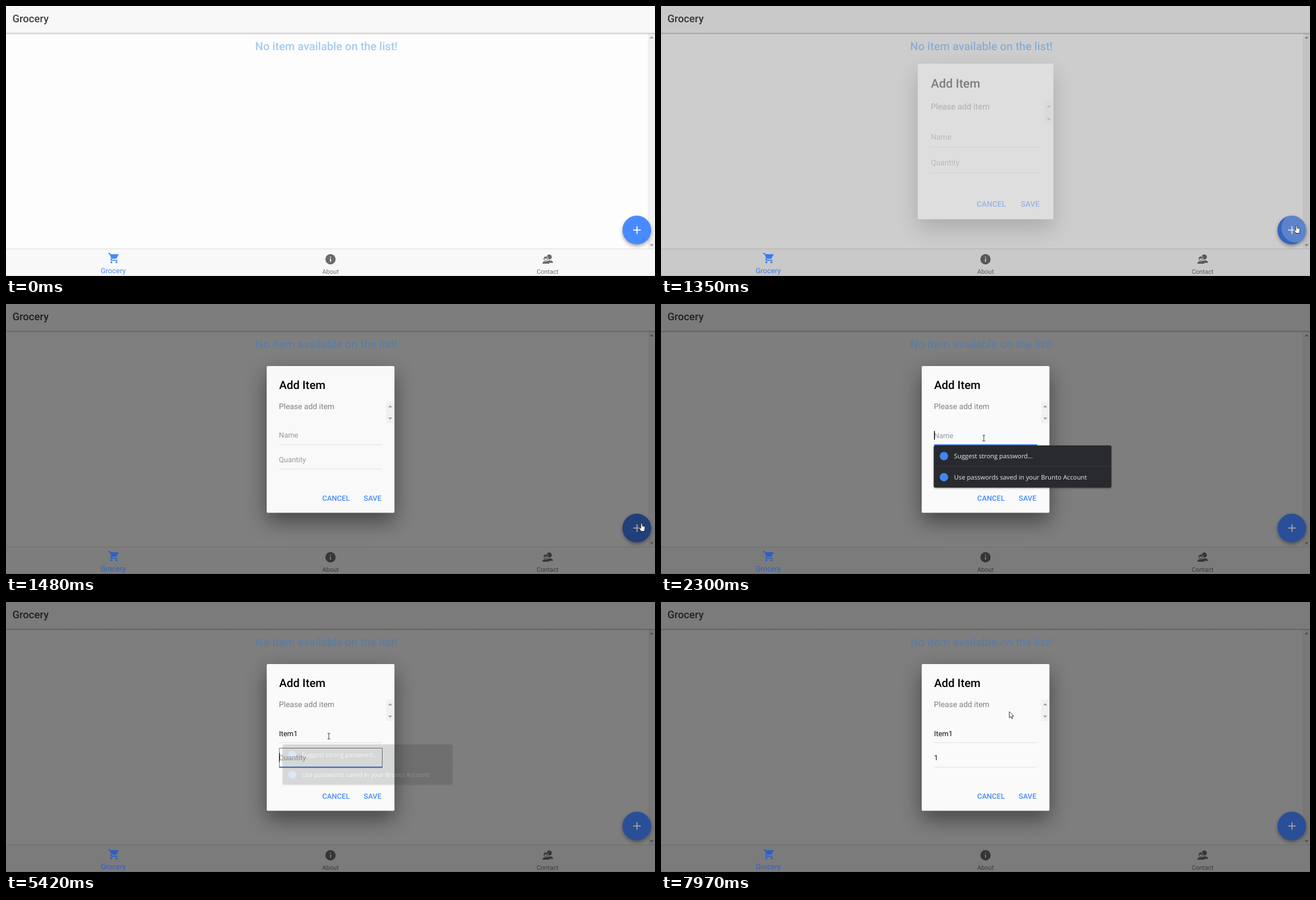
These frames come from a looping animation (1160x483 px, 8 s). An HTML page:

```html
<!DOCTYPE html>
<html lang="en">
<head>
<meta charset="utf-8">
<title>Grocery list</title>
<style>
  html, body { margin: 0; width: 100%; height: 100%; overflow: hidden; background: #fdfdfd; }
  svg { display: block; }
  text { font-family: Roboto, sans-serif; text-rendering: geometricPrecision; white-space: pre; }
  .medium { font-weight: 500; }
  .mid { text-anchor: middle; }
  .tab { font-size: 11.15px; fill: #6c7076; }
  .field { font-size: 13px; }
  .button { font-size: 13px; fill: #488aff; }
  .popup rect { fill: #292a2d; }
  .popup text { font: 11.3px "Open Sans", sans-serif; fill: #e8eaed; }
  .popup { filter: drop-shadow(0 1px 1.5px rgba(0,0,0,.4)); }
  #history text { font-size: 10.6px; font-weight: 600; }
  #dialog { filter: drop-shadow(0 15px 18.6px rgba(0,0,0,.45)); }
  #fab { filter: drop-shadow(0 3px 3px rgba(0,0,0,.35)); }
</style>
</head>
<body>
<svg width="1160" height="483" viewBox="0 0 1160 483">
  <defs>
    <linearGradient id="edge" x2="0" y2="1">
      <stop stop-opacity=".24"/><stop offset="1" stop-opacity="0"/>
    </linearGradient>
    <clipPath id="fabClip"><circle cx="1127.5" cy="400.8" r="25.7"/></clipPath>
    <path id="up" d="M-3.5 2L0-2 3.5 2Z" fill="#a0a0a0"/>
  </defs>

  <!-- page -->
  <rect width="1160" height="483" fill="#fdfdfd"/>
  <rect x="1147" y="49" width="13" height="386" fill="#f1f1f1"/>
  <use href="#up" x="1154" y="56"/>
  <use href="#up" transform="translate(1154 428) scale(1 -1)"/>
  <rect width="1160" height="48" fill="#f8f8f8"/>
  <rect y="48" width="1160" height="3.5" fill="url(#edge)"/>
  <text class="medium" x="11.4" y="29.3" font-size="18.6" fill="#424242">Grocery</text>
  <rect y="434" width="1160" height="49" fill="#f8f8f8"/>
  <path d="M0 434.5H1160M0 482.5H1160" stroke="#dadada"/>
  <circle cx="580" cy="453" r="9.2" fill="#6b6b6b"/>
  <path d="M580 452V457.6M580 448.4V450.3" stroke="#f8f8f8" stroke-width="1.9"/>
  <text class="tab mid" x="580" y="478.5">About</text>
  <g fill="#6b6b6b">
    <circle cx="971" cy="449" r="4.6"/>
    <path d="M967 459.500V456.500Q971 454 975 455.500Q978 457 978 459.500Z"/>
    <path d="M958.800 461Q959 456.600 964.500 456.300Q970 456.600 971.500 461Z"/>
    <circle cx="964.700" cy="452" r="4.300" stroke="#f8f8f8"/>
    <path d="M962 451.500Q965 452.500 967.500 451Q967.500 455 964.800 455Q962.300 455 962 451.500Z" fill="#f8f8f8"/>
  </g>
  <text class="tab mid" x="968" y="478.5">Contact</text>

  <rect id="backdrop" width="1160" height="483"/>

  <!-- coloured parts whose dimmed tint is set separately -->
  <text id="empty" class="medium mid" x="572.7" y="79.2" font-size="20.1">No item available on the list!</text>
  <g id="active">
    <path transform="translate(182 440.300) scale(.91)" d="M7 18a2 2 0 1 0 0 4a2 2 0 0 0 0-4zM1 2v2h2l3.600 7.600-1.350 2.450C4.500 15.400 5.500 17 7 17h12v-2H7.420q-.4-.1-.220-.4l.9-1.600h7.450q1.200 0 1.750-1l3.580-6.500Q21.500 4.200 20 4H5.210l-.940-2zM17 18a2 2 0 1 0 0 4a2 2 0 0 0 0-4z"/>
    <text class="mid" x="191.7" y="478.4" font-size="13">Grocery</text>
  </g>
  <g id="fab"><circle id="fabFace" cx="1127.5" cy="400.8" r="25.7"/></g>
  <circle id="press" cx="1127.5" cy="400.8" r="25.7"/>
  <g clip-path="url(#fabClip)"><circle id="ripple" cx="1135" cy="397" r="0" fill="#fff"/></g>
  <path id="plus" d="M1121 400.700H1134.500M1127.750 394V407.500" stroke-width="1.9"/>

  <g id="dialog">
    <rect x="466" y="111" width="228.300" height="262.500" rx="2" fill="#fafafa"/>
    <text class="medium" x="488.2" y="152" font-size="20.4">Add Item</text>
    <text x="487.8" y="188" font-size="13.9" fill="#808080">Please add item</text>
    <rect x="679.500" y="174.500" width="14" height="38.500" fill="#f1f1f1"/>
    <use href="#up" x="686.7" y="183"/>
    <use href="#up" transform="translate(686.7 205) scale(1 -1)"/>
    <path d="M488 251.700H672M488 295.300H672" stroke="#dedede"/>
    <path id="nameLine" d="M488 252H672.500" stroke="#3b78e7" stroke-width="2"/>
    <path id="amountLine" d="M488 295.600H672.500" stroke="#3b6fd6" stroke-width="2"/>
    <text id="name" class="field" x="487.9" y="239.5"></text>
    <text id="amount" class="field" x="487.9" y="282.7"></text>
    <rect id="outline" x="488.500" y="261.500" width="184" height="34.500" fill="none" stroke="#767676"/>
    <rect id="caret" width="1.3" height="16"/>
    <text class="button medium" x="565.2" y="352.4">CANCEL</text>
    <text class="button medium" x="639.3" y="352.4">SAVE</text>
  </g>

  <g id="suggest" class="popup">
    <rect x="487.500" y="253" width="317.500" height="75.500" rx="3"/>
    <path d="M488 290.500H805" stroke="#3a3b3f"/>
    <circle cx="505.700" cy="272" r="7.500" fill="#4285f4"/>
    <circle cx="505.700" cy="309.700" r="7.500" fill="#4285f4"/>
    <text x="523.8" y="276.3">Suggest strong password…</text>
    <text x="523.8" y="314">Use passwords saved in your Brunto Account</text>
  </g>
  <g id="history" class="popup">
    <rect x="487.500" y="296.500" width="184.500" height="81" rx="3"/>
    <text x="498" y="325.2">123</text>
    <text x="498" y="358">123123</text>
  </g>

  <path id="cursor"/>
</svg>

<script>
const LOOP = 8000;
const FOCUS_NAME = 2010, FOCUS_AMOUNT = 5340, TYPE_AMOUNT = 6530, BLUR = 7700;
const NAME_KEYS = [3670, 3770, 3870, 4130, 5060];
const CARET_TOGGLES = [2010, 2540, 3070, 4660, 5060, 5800, 6330, 7060, 7590, BLUR];
const POINTER = [
  [380, 949, 474], [860, 1136, 392], [1660, 1136, 392], [1960, 577, 240], [7060, 577, 240],
  [7130, 578, 236], [7310, 578, 236], [7620, 618, 189.5], [7800, 618, 189.5], [7970, 622.5, 196]
];
const SHAPES = {
  arrow: 'M0 0V11.200L2.600 8.800 4.400 12.800 6.200 12 4.500 8.200H8Z',
  beam: 'M-2.500-5H2.500M0-5V5M-2.500 5H2.500',
  hand: 'M-1.200 1Q0-.6 1.200 1V5L5.500 6.200Q6.300 7 6 9L5 14.500H-1L-4 10Q-4.600 8-3 8.200L-1.200 9.500Z'
};

const $ = id => document.getElementById(id);
const set = (id, attrs) => Object.entries(attrs).forEach(([k, v]) => $(id).setAttribute(k, v));
const show = (id, on) => set(id, { visibility: on ? 'visible' : 'hidden' });
const ramp = (t, from, to) => Math.min(1, Math.max(0, (t - from) / (to - from)));
const lerp = (a, b, k) => a + (b - a) * k;
const mix = (a, b, k) => `rgb(${a.map((v, i) => Math.round(lerp(v, b[i], k)))})`;
const scaleAt = (x, y, s) => `translate(${x} ${y}) scale(${s}) translate(${-x} ${-y})`;

function pointerAt(t) {
  const i = POINTER.findIndex(p => p[0] > t);
  if (i < 0) return POINTER.at(-1).slice(1);
  if (i === 0) return POINTER[0].slice(1);
  const [t0, x0, y0] = POINTER[i - 1], [t1, x1, y1] = POINTER[i];
  const k = ramp(t, t0, t1), e = k * k * (3 - 2 * k);
  return [lerp(x0, x1, e), lerp(y0, y1, e)];
}

function drawPointer(t) {
  const [x, y] = pointerAt(t);
  const shape = x > 1104 && y < 428 && y > 375 ? 'hand'
    : x > 488 && x < 672 && y > 222 && y < 252 ? 'beam' : 'arrow';
  show('cursor', t >= 380);
  set('cursor', {
    d: SHAPES[shape], transform: `translate(${x} ${y})`, 'stroke-width': .9,
    fill: shape === 'beam' ? 'none' : '#fff', stroke: '#222'
  });
}

// Popups fade and shrink a little when they open and close.
function drawPopup(id, cx, cy, t, open, opened, close, closed) {
  const grow = ramp(t, open, opened), leave = ramp(t, close, closed);
  set(id, {
    opacity: grow * (1 - leave) ** 1.5,
    transform: scaleAt(cx, cy, 1 - .062 * Math.max(1 - grow, leave))
  });
}

function drawField(id, value, placeholder) {
  $(id).textContent = value || placeholder;
  set(id, { fill: value ? '#111' : '#999' });
}

function render(t) {
  const p = 1 - (1 - ramp(t, 1328, 1530)) ** 4;
  set('backdrop', { opacity: p / 2 });
  set('dialog', { opacity: p, transform: scaleAt(580.2, 242.2, 1.1 - .1 * p) });

  set('empty', { fill: mix([165, 203, 240], [91, 125, 162], p) });
  set('active', { fill: mix([72, 138, 255], [44, 96, 196], p) });
  set('fabFace', { fill: mix([72, 138, 255], [42, 79, 152], p) });
  set('plus', { stroke: mix([255, 255, 255], [160, 160, 160], p) });
  set('press', { opacity: ramp(t, 1130, 1200) * (1 - ramp(t, 1690, 1850)) * (.08 + .12 * p) });
  set('ripple', { r: 26 * Math.max(0, t - 1130) / 220, opacity: .2 * (1 - ramp(t, 1370, 1470)) });

  const onName = t >= FOCUS_NAME && t < FOCUS_AMOUNT;
  const onAmount = t >= FOCUS_AMOUNT && t < BLUR;
  const name = 'Item1'.slice(0, NAME_KEYS.filter(k => t >= k).length);
  const amount = t >= TYPE_AMOUNT ? '1' : '';
  drawField('name', name, 'Name');
  drawField('amount', amount, 'Quantity');
  show('nameLine', onName);
  show('amountLine', onAmount);
  show('outline', onAmount);

  const typed = onName ? name : amount;
  const width = typed ? $(onName ? 'name' : 'amount').getComputedTextLength() : 0;
  set('caret', { x: 488 + width, y: onName ? 227 : 270 });
  show('caret', CARET_TOGGLES.filter(k => t >= k).length % 2);

  drawPopup('suggest', 646, 291, t, 2220, 2300, 5330, 5460);
  drawPopup('history', 580, 337, t, TYPE_AMOUNT - 1, TYPE_AMOUNT, BLUR, BLUR + 130);
  drawPointer(t);
}

const start = performance.now();
function tick() {
  render((performance.now() - start) % LOOP);
  requestAnimationFrame(tick);
}
tick();
</script>
</body>
</html>
```
